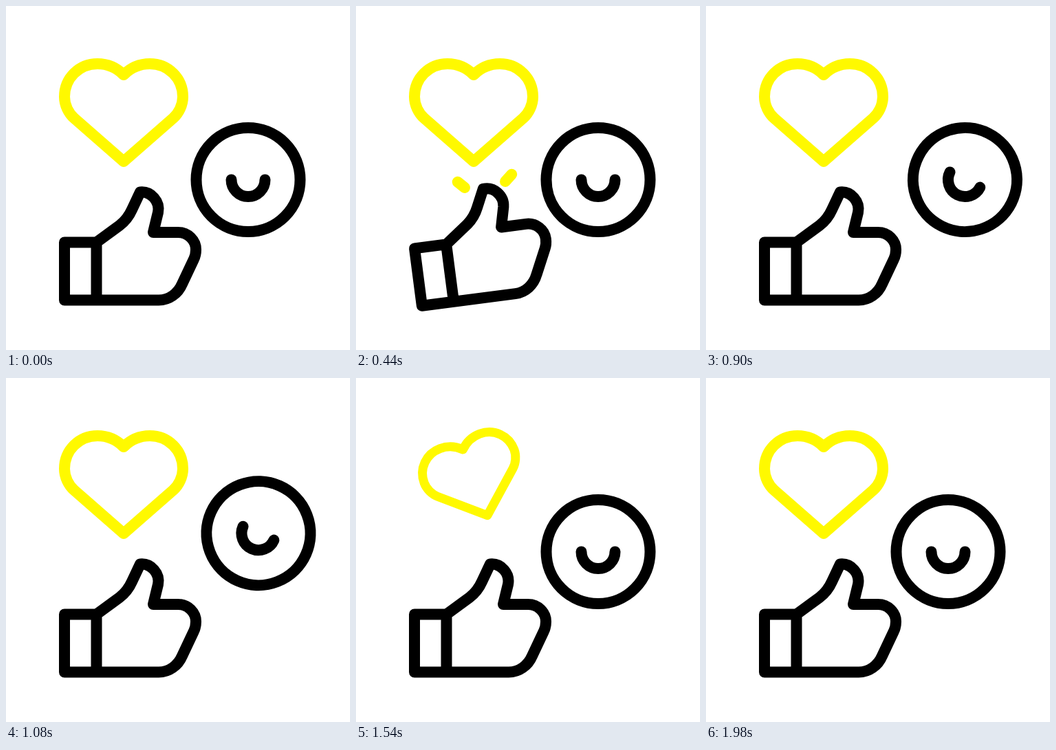
An HTML page for the animation above (2000 ms loop, 500 by 500 pixels).

```html
<!DOCTYPE html>
<html lang="en">
<head>
<meta charset="utf-8">
<title>Reactions</title>
<style>
  html, body { margin: 0; width: 100%; height: 100%; overflow: hidden; background: #fff; }
  svg { display: block; width: 100%; height: 100%; }
  path, circle { fill: none; stroke: #000; stroke-width: 16; stroke-linecap: round; stroke-linejoin: round; }
  .yellow, .ray { stroke: #fff900; }

  /* 1% of the loop is 20 ms */
  .thumb, .roll, .hop, .heart, .ray { animation: 2s linear infinite; }

  .thumb { transform-origin: 154px 347.5px; animation-name: thumb; }
  @keyframes thumb {
    0% { rotate: 0deg; animation-timing-function: cubic-bezier(.4, 0, .7, .7); }
    27% { rotate: -9.5deg; animation-timing-function: ease-in-out; }
    35%, 100% { rotate: 0deg; }
  }

  .roll { transform-origin: 352px 252.5px; animation-name: slide, spin; }
  @keyframes slide {
    0%, 33% { translate: 0 0; animation-timing-function: ease-in-out; }
    48% { translate: 26.5px 0; }
    54% { translate: 15px 0; }
    66%, 100% { translate: 0 0; }
  }
  @keyframes spin {
    0%, 35% { rotate: 0deg; animation-timing-function: ease-in-out; }
    48% { rotate: 30deg; }
    54% { rotate: 24deg; }
    66%, 100% { rotate: 0deg; }
  }
  .hop { animation-name: hop; }
  @keyframes hop {
    0%, 49% { translate: 0 0; animation-timing-function: cubic-bezier(.333, .667, .667, 1); }
    57% { translate: 0 -31px; animation-timing-function: cubic-bezier(.333, 0, .667, .333); }
    65%, 100% { translate: 0 0; }
  }

  .heart { transform-origin: 171px 155px; animation-name: lift, twist; }
  @keyframes lift {
    0%, 67% { translate: 0 0; animation-timing-function: ease-in-out; }
    81% { translate: 0 -11px; animation-timing-function: ease-in-out; }
    90%, 100% { translate: 0 0; }
  }
  @keyframes twist {
    0%, 67% { rotate: 0deg; scale: 1; animation-timing-function: ease-in-out; }
    79% { rotate: -21.5deg; scale: .8; }
    89%, 100% { rotate: 0deg; scale: 1; }
  }

  /* each ray grows outwards, then its tail catches up */
  .ray { visibility: hidden; animation-name: burst; animation-delay: var(--at); }
  @keyframes burst {
    0% { visibility: visible; stroke-dasharray: 0 900; stroke-dashoffset: 0; }
    4% { visibility: visible; stroke-dasharray: 100 900; stroke-dashoffset: 0; }
    10% { visibility: hidden; stroke-dasharray: 0 900; stroke-dashoffset: -100; }
    100% { visibility: hidden; stroke-dasharray: 0 900; stroke-dashoffset: -100; }
  }
</style>
</head>
<body>
<svg viewBox="0 0 500 500">
  <g style="--at: -1600ms">
    <path class="ray" pathLength="100" d="M158 264L138 248"/>
    <path class="ray" pathLength="100" d="M217 255L235 235"/>
  </g>
  <g style="--at: -860ms">
    <path class="ray" pathLength="100" d="M390 130L382 102"/>
    <path class="ray" pathLength="100" d="M438 160L466 154"/>
  </g>
  <g style="--at: -260ms">
    <path class="ray" pathLength="100" d="M88 47L69 28"/>
    <path class="ray" pathLength="100" d="M254 47L275 28"/>
  </g>

  <g class="heart">
    <path class="yellow" d="M171 100C161 90 148 84 133 84C106 84 85 105 85 132C85 144 91 156 99 163L171 226L243 163C251 156 257 144 257 132C257 105 236 84 209 84C194 84 181 90 171 100Z"/>
  </g>

  <g class="thumb">
    <path d="M131.5 343.5H85V427.5H222C237 427.5 250 418 256 404L273 368C275 364 276 359 276 354C276 341 265 329 250 329H214L221 300C224 284 211 269 195 270.5L183 296C179 305 174 312 165 319ZV427.5"/>
  </g>

  <g class="hop">
    <g class="roll">
      <circle cx="352" cy="252.5" r="75.5"/>
      <path d="M327.5 252.5A24.5 24.5 0 0 0 376.5 252.5"/>
    </g>
  </g>
</svg>
</body>
</html>
```
